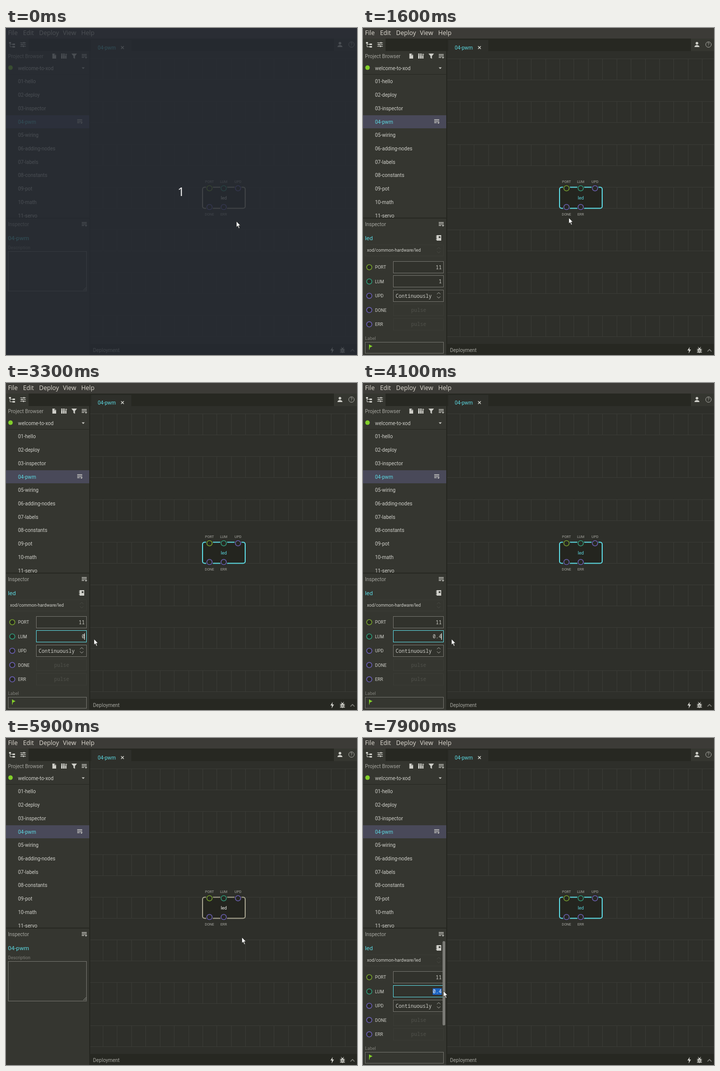
Recreate the animation shown at these times as an HTML page with a canvas. Size 700x652 px, loop 8 s.

```html
<!DOCTYPE html>
<html lang="en">
<head>
<meta charset="utf-8">
<title>Patch editor</title>
<style>
html, body { margin: 0; width: 700px; height: 652px; overflow: hidden; background: #2e2f2a; }
canvas { display: block; }
</style>
</head>
<body>
<canvas id="stage" width="700" height="652"></canvas>
<script>
const ctx = document.getElementById('stage').getContext('2d');
const LOOP = 8000, STEP = 100;
const C = {
  menu: '#3c3b37', side: '#353630', canvas: '#2e2f2a', dark: '#272822', line: '#3a3b36',
  text: '#cfcfc9', dim: '#a5a59f', faint: '#7d7d77', edge: '#74746e', ghost: '#40413b',
  cyan: '#5cd9e2', green: '#769f2f', teal: '#309878', violet: '#6a5fb2',
  row: '#494959', blue: '#1b62c0', lime: '#82cf2a', white: '#f4f4f0'
};
const SANS = 'Roboto, sans-serif', MONO = '"Noto Sans Mono", monospace';
const FILES = ['hello', 'deploy', 'inspector', 'pwm', 'wiring', 'adding-nodes', 'labels',
  'constants', 'pot', 'math', 'servo'];

// Pointer path: time, x, y
const PATH = [
  [0, 459, 385], [400, 459, 385], [500, 465, 371], [600, 465, 371], [700, 465, 362],
  [900, 464, 338], [1300, 464, 339], [1600, 410, 378], [1900, 240, 472], [2100, 165, 502],
  [2200, 165, 502], [2500, 139, 506], [2700, 139, 506], [2900, 158, 506], [3100, 174, 510],
  [3200, 175, 510], [4000, 175, 510], [4100, 176, 510], [4500, 176, 510], [5100, 272, 483],
  [5400, 367, 398], [5600, 367, 398], [5900, 470, 397], [6000, 470, 397], [6100, 482, 397],
  [6200, 481, 390], [6500, 464, 340], [6900, 464, 340], [7100, 390, 385], [7300, 170, 492],
  [7400, 129, 506], [7600, 129, 506], [7900, 160, 504], [8000, 160, 504]
];

function pointerAt(t) {
  const i = PATH.findIndex((p, k) => k && t <= p[0]);
  const [t0, x0, y0] = PATH[i - 1], [t1, x1, y1] = PATH[i];
  const k = (t - t0) / (t1 - t0);
  return { x: Math.round(x0 + (x1 - x0) * k), y: Math.round(y0 + (y1 - y0) * k) };
}

const within = (t, a, b) => t >= a && t < b;

function stateAt(t) {
  const p = pointerAt(t);
  const selected = within(t, 1100, 5600) || t >= 6800;
  const hover = p.x > 390 && p.x < 478 && p.y > 316 && p.y < 360;
  const inField = p.x > 61 && p.x < 159 && p.y > 493 && p.y < 517;
  return {
    t, p, selected, hover, inField,
    tip: selected && hover ? (t === 1100 ? 0.5 : 1) : 0,
    scroll: selected && p.x < 167 && p.y > 402,
    focus: within(t, 2600, 4600) || t >= 7600,
    value: t < 3200 ? '1' : t < 3700 ? '0' : t < 3800 ? '0.' : '0.4',
    selecting: within(t, 2700, 3200) || t >= 7700
  };
}

function box(x, y, w, h, color) {
  ctx.fillStyle = color;
  ctx.fillRect(x, y, w, h);
}

function frame(x, y, w, h, color) {
  ctx.strokeStyle = color;
  ctx.lineWidth = 1;
  ctx.strokeRect(x + 0.5, y + 0.5, w - 1, h - 1);
}

function text(str, x, y, size, color, { align = 'left', font = SANS, weight = 400 } = {}) {
  ctx.font = `${weight} ${size}px ${font}`;
  ctx.textAlign = align;
  ctx.textBaseline = 'alphabetic';
  ctx.fillStyle = color;
  ctx.fillText(str, x, y);
}

function poly(points, color) {
  ctx.beginPath();
  points.forEach(([x, y]) => ctx.lineTo(x, y));
  ctx.closePath();
  ctx.fillStyle = color;
  ctx.fill();
}

function stroke(points, color, width = 1) {
  ctx.beginPath();
  points.forEach(([x, y]) => ctx.lineTo(x, y));
  ctx.strokeStyle = color;
  ctx.lineWidth = width;
  ctx.stroke();
}

function disc(x, y, r, color) {
  ctx.beginPath();
  ctx.arc(x, y, r, 0, 7);
  ctx.fillStyle = color;
  ctx.fill();
}

function ring(x, y, r, color, width = 1.6) {
  ctx.beginPath();
  ctx.arc(x, y, r, 0, 7);
  ctx.strokeStyle = color;
  ctx.lineWidth = width;
  ctx.stroke();
}

function at(x, y, draw) {
  ctx.save();
  ctx.translate(x, y);
  draw();
  ctx.restore();
}

function listIcon(x, y) {
  at(x, y, () => {
    box(-5, -4, 10, 1.4, C.text);
    box(-5, -1, 10, 1.4, C.text);
    box(-5, 2, 5, 1.4, C.text);
    poly([[1, 2], [6, 2], [3.5, 5]], C.text);
  });
}

function toolbarIcons() {
  at(12, 33, () => {
    box(-6, -5, 4, 3, C.text);
    box(1, -2, 5, 3, C.text);
    box(1, 3, 5, 3, C.text);
    stroke([[-4, -3], [-4, 4.5], [2, 4.5]], C.text);
    stroke([[-4, -0.5], [2, -0.5]], C.text);
  });
  at(34, 33, () => [-3.5, 0, 3.5].forEach((y, i) => {
    box(-5.5, y - 0.6, 11, 1.2, C.text);
    box([1, -3, 0][i], y - 1.6, 1.6, 3.2, C.text);
  }));
}

function browserIcons() {
  at(96, 56, () => {
    poly([[-3.5, -5], [1, -5], [4, -2], [4, 5], [-3.5, 5]], C.text);
    poly([[0.7, -4.3], [0.7, -1.7], [3.4, -1.7]], C.side);
  });
  at(116, 56, () => {
    box(-6, -5, 3, 10, C.text);
    box(-2, -5, 3, 10, C.text);
    box(2, -1, 2.6, 6, C.text);
    box(1.8, -3.6, 4, 1.1, C.text);
    box(3.2, -5, 1.1, 4, C.text);
    box(-5.2, -3, 1.4, 1, C.side);
    box(-1.2, -3, 1.4, 1, C.side);
  });
  at(136, 56, () => poly([[-5.5, -5], [5.5, -5], [1.5, 0], [1.5, 5.5], [-1.5, 3.5], [-1.5, 0]], C.text));
  listIcon(156, 56);
}

function sidebar() {
  box(0, 21, 167, 631, C.side);
  box(45, 21, 122, 25, C.dark);
  toolbarIcons();
  text('Project Browser', 4, 60, 10, C.dim);
  browserIcons();
  disc(9, 79, 4.5, C.lime);
  text('welcome-to-xod', 24, 83.5, 10, C.text);
  poly([[151, 78.5], [157, 78.5], [154, 81.8]], C.text);
  box(0, 92, 166, 1, C.dark);

  ctx.save();
  ctx.beginPath();
  ctx.rect(0, 93, 166, 285);
  ctx.clip();
  FILES.forEach((name, i) => {
    const y = 106.8 + 26.72 * i, active = name === 'pwm';
    if (active) box(0, 174, 166, 26, C.row);
    text(`${String(i + 1).padStart(2, '0')}-${name}`, 24, y + 3.6, 10, active ? C.cyan : C.text);
  });
  ctx.restore();
  listIcon(147, 186);

  box(0, 378, 166, 2, C.dark);
  text('Inspector', 4, 394.5, 10, C.dim);
  listIcon(156, 391);
}

function projectInspector() {
  text('04-pwm', 4, 423, 11.7, C.cyan);
  text('Description', 4, 441, 8.8, C.faint);
  frame(4, 445, 157, 80, C.edge);
  stroke([[154, 523], [160, 517]], C.dim, 0.8);
  stroke([[157, 523], [160, 520]], C.dim, 0.8);
}

function arrows(x, y, color) {
  stroke([[x - 3.5, y - 2.5], [x, y - 5.5], [x + 3.5, y - 2.5]], color);
  stroke([[x - 3.5, y + 2.5], [x, y + 5.5], [x + 3.5, y + 2.5]], color);
}

function nodeInspector(s) {
  const mono = { font: MONO };
  text('led', 4, 423, 11.7, C.cyan);
  at(151, 418, () => {
    box(-4, -5, 9, 11, C.text);
    [-3.5, -0.3, 3].forEach(y => box(-5.5, y, 3, 1.3, C.text));
    box(0, -2.5, 3.5, 3, C.side);
  });
  frame(4, 432, 157, 23, '#3b3c36');
  text('xod/common-hardware/led', 8, 446.3, 8.8, C.text);
  arrows(151, 443, '#484943');

  [['PORT', C.green], ['LUM', C.teal], ['UPD', C.violet], ['DONE', C.violet], ['ERR', C.violet]]
    .forEach(([name, color], i) => {
      const y = 477 + 28.45 * i, top = Math.round(y - 12);
      disc(12.5, y, 5.5, C.dark);
      ring(12.5, y, 5.2, color);
      text(name, 24, y + 3.4, 8.8, C.text);
      if (i < 3) box(60, top, 101, 24, '#31322c');
      frame(60, top, 101, 24, i > 2 ? '#3b3c36' : i === 1 && s.focus ? C.cyan : C.edge);
      if (i > 2) text('pulse', 111, y + 3.5, 10, '#50514b', { ...mono, align: 'center' });
    });
  text('11', 157, 481, 10, C.text, { ...mono, align: 'right' });

  const start = 157 - 6 * s.value.length;
  if (s.selecting) {
    const end = Math.max(start, Math.min(157, s.p.x));
    box(start, 499, end - start, 13, C.blue);
  }
  text(s.value, 157, 509.3, 10, s.selecting ? C.white : C.text, { ...mono, align: 'right' });
  if (s.focus && !s.selecting) box(s.t < 3200 || s.t >= 7600 ? start - 0.5 : 156, 499, 1, 13, C.white);

  text('Continuously', 65, 537.6, 10, C.text, mono);
  arrows(151, 533, C.dim);
  text('Label', 4, 622, 9, C.faint);
  frame(4, 626, 157, 23, C.edge);
  box(12, 631, 1.2, 10, C.lime);
  poly([[13, 631.5], [19, 634.5], [13, 637.5]], C.lime);
  if (s.scroll) {
    ctx.beginPath();
    ctx.roundRect(158.7, 405, 5.3, 168, 2.5);
    ctx.fillStyle = '#7c7c77';
    ctx.fill();
  }
}

function workspace() {
  box(167, 46, 533, 584, C.canvas);
  for (let r = 0; r < 7; r++) {
    const y = Math.round(61 + 85.25 * r);
    box(167, y, 533, 1, C.line);
    box(167, y + 42, 533, 1, C.line);
    for (let k = 0; k < 18; k++) box(Math.round(193 + 28.43 * k), y, 1, 42, C.line);
  }
  box(166, 21, 2, 631, '#252620');
  box(167, 21, 487, 25, C.dark);
  box(654, 21, 46, 25, C.side);
  box(170, 24, 80, 22, C.canvas);
  text('04-pwm', 183, 42.6, 10, C.cyan);
  stroke([[229.5, 36.2], [235, 41.7]], C.text, 1.4);
  stroke([[235, 36.2], [229.5, 41.7]], C.text, 1.4);

  disc(666, 30.3, 2.6, C.text);
  ctx.beginPath();
  ctx.ellipse(666, 38, 5, 4, 0, Math.PI, 0);
  ctx.fill();
  ring(689, 33, 5.5, C.dim, 1);
  text('?', 689, 36.4, 9, C.dim, { align: 'center' });
}

function statusBar() {
  box(168, 630, 532, 22, C.dark);
  text('Deployment', 173.5, 646, 10, C.dim);
  poly([[651.5, 636], [647, 643], [650, 643], [649.5, 649], [654, 641], [651, 641]], C.text);
  at(671, 642, () => {
    ctx.beginPath();
    ctx.ellipse(0, 1, 3, 5, 0, 0, 7);
    ctx.fillStyle = C.text;
    ctx.fill();
    [-2, 1, 4].forEach(y => box(-5, y, 10, 1.2, C.text));
    stroke([[-3, -6], [0, -3], [3, -6]], C.text);
    box(-1.5, 0, 3, 1, C.dark);
    box(-1.5, 2.6, 3, 1, C.dark);
  });
  stroke([[687, 645], [691, 641], [695, 645]], C.faint, 1.6);
}

function node(s) {
  ctx.beginPath();
  ctx.roundRect(392, 317.5, 85, 42, 4);
  ctx.fillStyle = '#24251f';
  ctx.fill();
  ctx.strokeStyle = s.selected ? C.cyan : s.hover ? C.white : '#a5a28e';
  ctx.lineWidth = 2;
  ctx.stroke();
  text('led', 434.3, 341.8, 9, s.selected ? C.cyan : C.white, { align: 'center' });
  const pin = (name, x, y, labelY, color) => {
    disc(x, y, 7.2, '#272822');
    ring(x, y, 5.3, color, 1.5);
    text(name, x, labelY, 7.1, C.dim, { align: 'center' });
  };
  pin('PORT', 405.8, 319.5, 309.3, C.green);
  pin('LUM', 434.2, 319.5, 309.3, C.teal);
  pin('UPD', 462.7, 319.5, 309.3, C.violet);
  pin('DONE', 405.8, 357, 373.5, C.violet);
  pin('ERR', 434.2, 357, 373.5, C.violet);
}

function tooltip(alpha) {
  ctx.save();
  ctx.globalAlpha = alpha;
  ctx.beginPath();
  ctx.roundRect(470.5, 346, 135, 37, 2);
  ctx.shadowColor = 'rgba(0,0,0,.3)';
  ctx.shadowBlur = 3;
  ctx.fillStyle = 'rgba(35,36,31,.95)';
  ctx.fill();
  ctx.shadowBlur = 0;
  text('led', 477, 360, 10, C.text, { weight: 700 });
  text('xod/common-hardware/led', 477, 374, 10, C.dim);
  ctx.restore();
}

function pointer({ p, inField, selected }) {
  at(p.x, p.y, () => {
    if (inField && selected) {
      const beam = [[-3, -6], [-0.8, -5.5], [0, -4.5], [0, 5], [-0.8, 6], [-3, 6.5]];
      const mirror = beam.map(([x, y]) => [-x, y]);
      [['#22231e', 2.6], [C.white, 1.2]].forEach(([color, w]) => {
        stroke(beam, color, w);
        stroke(mirror, color, w);
      });
      return;
    }
    const shape = [[0.5, 0.5], [0.5, 12], [3.2, 9.6], [5.2, 14.5], [7, 13.7], [5, 9], [8.4, 8.7]];
    poly(shape, '#ffffff');
    stroke([...shape, shape[0]], '#20211d', 0.7);
  });
}

function countdown() {
  box(0, 0, 700, 652, 'rgba(38,42,51,.79)');
  text('1', 349, 335, 24, '#eeeeee', { align: 'center', font: '"Noto Sans", sans-serif' });
}

function draw(t) {
  const s = stateAt(t);
  box(0, 0, 700, 652, C.side);
  box(0, 0, 700, 21, C.menu);
  [['File', 4], ['Edit', 34], ['Deploy', 66], ['View', 113.5], ['Help', 150]].forEach(([name, x]) =>
    text(name, x, 14.3, 12.2, '#dfdbd2', { font: '"Open Sans", sans-serif' }));
  sidebar();
  if (s.selected) nodeInspector(s);
  else projectInspector();
  workspace();
  statusBar();
  node(s);
  if (s.tip) tooltip(s.tip);
  if (t < 100) countdown();
  pointer(s);
}

function tick(now) {
  draw(Math.floor((now % LOOP) / STEP) * STEP);
  requestAnimationFrame(tick);
}
requestAnimationFrame(tick);
</script>
</body>
</html>
```
